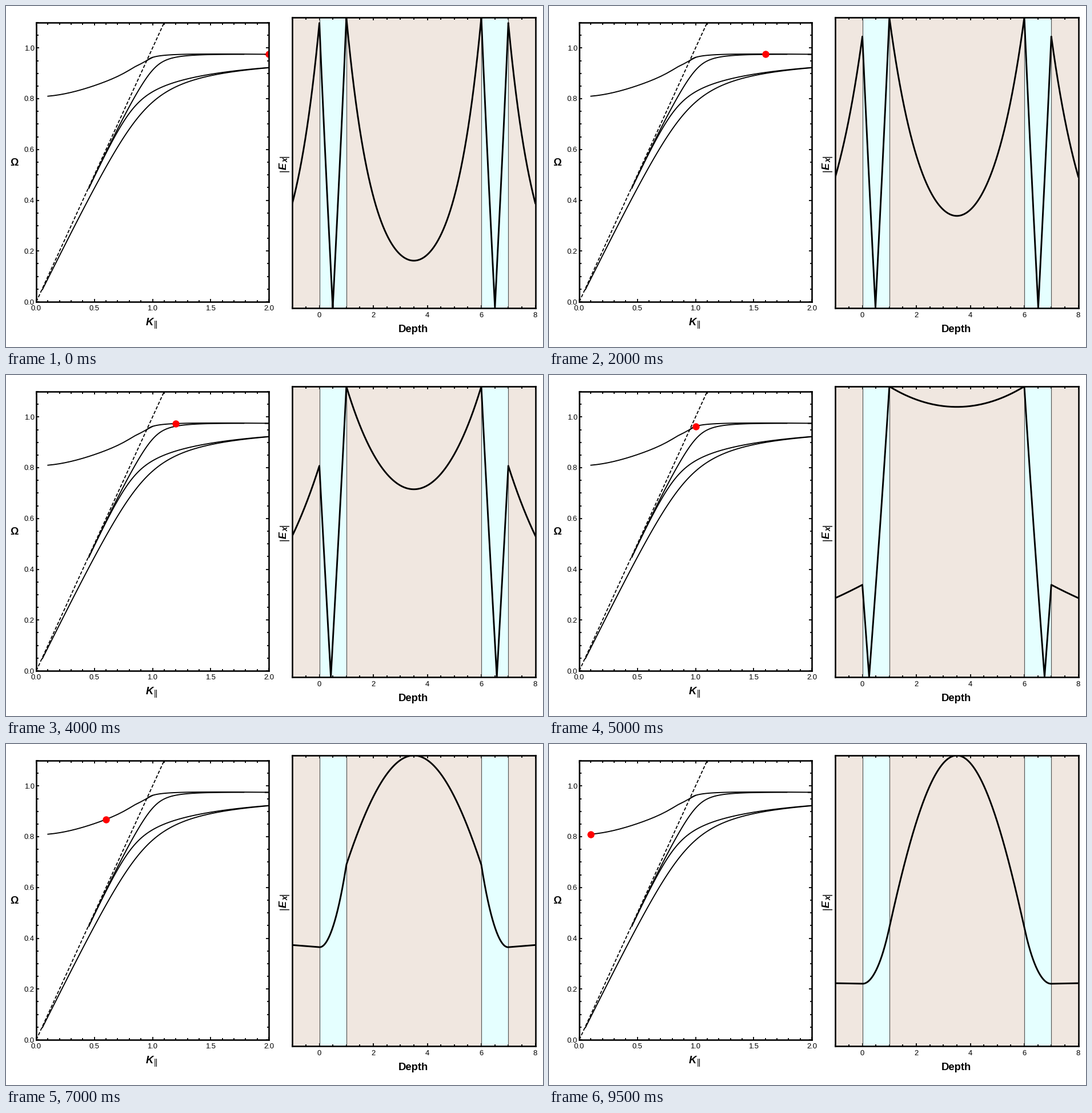
These frames come from a looping animation (940x596 px, 10000 ms). A matplotlib script:

```python
import numpy as np
import matplotlib.pyplot as plt
from matplotlib.animation import FuncAnimation
from matplotlib.ticker import MultipleLocator

W, H, DPI = 940, 596, 100
PX = 72 / DPI                 # one pixel in points
EPS_INF = 13.0                # background permittivity of the plasma layers
D = 0.573                     # layer thickness in plasma units
HALF_GAP = 2.5 * D            # half the distance between the layers
FRAMES, INTERVAL = 20, 500

plt.rcParams["font.family"] = "Liberation Sans"


# ---- physics: two plasma layers in vacuum -------------------------------

def layer(k, w):
    eps = EPS_INF * (1 - 1 / w**2)
    return eps, np.sqrt(k**2 - eps * w**2)


def decay(k, w):
    """Vacuum decay constant: bound past the light line, outgoing before it."""
    if k > 0.95:
        return np.sqrt(k**2 - w**2)
    return -1j * np.sqrt(w**2 - k**2)


def dispersion(k, w, kappa, even=True):
    eps, q = layer(k, w)
    ch, sh = np.cosh(q * D), np.sinh(q * D)
    h = eps / q * kappa * sh + ch
    e = kappa * ch + q / eps * sh
    c, s = np.cosh(kappa * HALF_GAP), np.sinh(kappa * HALF_GAP)
    return h * c + e * s / kappa if even else h * s + e * c / kappa


def track(ks, w):
    """Follow one mode along ks with Newton steps."""
    found = {}
    step = 1e-6
    for k in ks:
        def f(x):
            return dispersion(k, x, decay(k, x))
        for _ in range(15):
            w = w - f(w) * step / (f(w + step) - f(w))
        found[round(float(k), 2)] = w
    return found


leaky = track(np.arange(2, 19) / 20, 0.81 - 0.015j)
bound = track(np.arange(20, 9, -1) / 10, 0.975 + 0j)
modes = {**leaky, **bound}

depth = np.linspace(-1, 8, 3601)


def field(k):
    w = modes[k]
    kappa = decay(k, w)
    eps, q = layer(k, w)
    x = D * (3.5 - np.abs(depth - 3.5))
    slope = q / (eps * kappa)

    def inside(u):
        return np.cosh(q * u) + slope * np.sinh(q * u)

    middle = (inside(D) * np.cosh(kappa * (x - D - HALF_GAP))
              / np.cosh(kappa * HALF_GAP))
    e = np.where(x < 0, np.exp(kappa * x), np.where(x < D, inside(x), middle))
    e = np.abs(e)
    return e / e.max()


# ---- stage --------------------------------------------------------------

fig = plt.figure(figsize=(W / DPI, H / DPI), dpi=DPI, facecolor="white")


def panel(left, top, right, bottom, xlim, ylim):
    ax = fig.add_axes([left / W, 1 - bottom / H,
                       (right - left) / W, (bottom - top) / H])
    ax.set(xlim=xlim, ylim=ylim)
    ax.set_autoscale_on(False)
    for spine in ax.spines.values():
        spine.set_linewidth(2.6 * PX)
    ax.tick_params(which="both", direction="in", top=True, right=True,
                   width=1.8 * PX, labelbottom=False, labelleft=False)
    ax.tick_params(which="major", length=5 * PX)
    ax.tick_params(which="minor", length=3.5 * PX)
    return ax


def label(x, y, text, size=13, **kw):
    style = dict(ha="center", va="center_baseline", color="black")
    style.update(kw)
    fig.text(x / W, 1 - y / H, text, fontsize=size * PX, **style)


# ---- dispersion diagram -------------------------------------------------

left = panel(53, 29, 460, 517, (0, 2), (0, 1.1))
left.xaxis.set_major_locator(MultipleLocator(0.5))
left.xaxis.set_minor_locator(MultipleLocator(0.1))
left.yaxis.set_major_locator(MultipleLocator(0.2))
left.yaxis.set_minor_locator(MultipleLocator(0.05))

left.plot([0, 1.1], [0, 1.1], color="black", lw=1.8 * PX,
          ls=(0, (3.2, 1.7)), dash_capstyle="butt")

t, kk = np.meshgrid(np.linspace(0.002, 0.985, 500), np.linspace(0.05, 2, 391))
ww = np.minimum(kk, 0.99) * (1 - t**2)
kap = np.sqrt(kk**2 - ww**2)
hugging = (kk < 0.45) & (ww > 0.965 * kk)
gap = (kk > 1.79) & (kk < 1.965) & (ww > 0.95)
for even, hidden in ((True, hugging), (False, hugging | gap)):
    value = np.ma.masked_where(hidden, dispersion(kk, ww, kap, even))
    left.contour(kk, ww, value, levels=[0], colors="black",
                 linewidths=1.9 * PX, linestyles="solid")
left.set(xlim=(0, 2), ylim=(0, 1.1))

top_k = list(leaky) + [1.0]
left.plot(top_k, [modes[k].real for k in top_k], color="black", lw=1.9 * PX)

marker, = left.plot([], [], "o", color="#ff0000", ms=12.4 * PX, mew=0,
                    zorder=2.4)

for i in range(5):
    label(53 + i * 101.75, 527, f"{i * 0.5:.1f}")
for i in range(6):
    label(50, 517 - i * 88.8, f"{i * 0.2:.1f}", ha="right")
label(14, 272.5, "Ω", 18, weight="bold")
label(245, 558, "K", 18.5, weight="bold", style="italic",
      ha="left", va="baseline")
label(259, 561, "||", 14, ha="left", va="baseline")

# ---- field profile ------------------------------------------------------

right = panel(501.3, 20, 926.5, 527.8, (-1, 8), (0, 1))
right.set_facecolor("#f0e7e0")
right.xaxis.set_major_locator(MultipleLocator(2))
right.xaxis.set_minor_locator(MultipleLocator(0.5))
right.set_yticks([])
for start in (0, 6):
    right.axvspan(start, start + 1, facecolor="#e5ffff", lw=0)
    for edge in (start, start + 1):
        right.axvline(edge, color="#555555", lw=1.2 * PX)
profile, = right.plot([], [], color="black", lw=2.9 * PX)

for z in range(0, 9, 2):
    label(548.5 + z * 47.25, 540, str(z))
label(713, 570, "Depth", 18.5, weight="bold", va="baseline")

upward = dict(rotation=90, rotation_mode="anchor", ha="left", va="baseline")
label(491, 290.5, "|", 18, **upward)
label(491, 286, "E", 18, weight="bold", style="italic", **upward)
label(494, 273.5, "x", 13.5, weight="bold", style="italic", **upward)
label(491, 265, "|", 18, **upward)


# ---- motion -------------------------------------------------------------

def draw(i):
    k = round(2 - 0.1 * i, 2)
    marker.set_data([k], [modes[k].real])
    profile.set_data(depth, field(k))
    return marker, profile


anim = FuncAnimation(fig, draw, frames=FRAMES, interval=INTERVAL,
                     repeat=True, repeat_delay=0)
plt.show()
```
